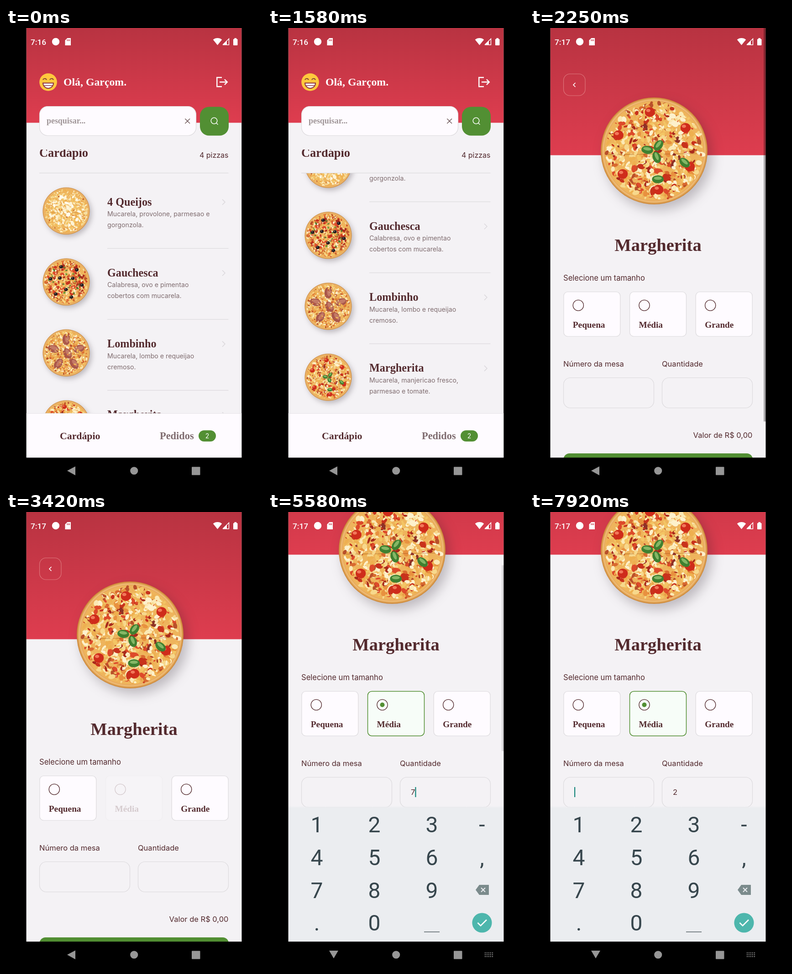
Recreate the animation shown at these times as an HTML page with a canvas. Size 561 by 998 pixels, loop 8 s.

```html
<!DOCTYPE html>
<html lang="pt-BR">
<head>
<meta charset="utf-8">
<title>Pizzaria</title>
<style>
html, body { margin: 0; width: 100%; height: 100%; overflow: hidden; background: #000; }
canvas { display: block; width: 100%; height: 100%; }
</style>
</head>
<body>
<canvas id="stage" width="561" height="998"></canvas>
<script>
const W = 561, H = 998, LOOP = 8000, FPS = 12;
const LEFT = 44.5, WIDTH = 472, BOTTOM = 940.3;
const SERIF = '"Liberation Serif", "Noto Serif", serif';
const SANS = 'Inter, "Open Sans", sans-serif';
const ROBOTO = 'Roboto, sans-serif';
const BG = '#f4f2f5', CARD = '#fefbff', LINE = '#dcdadd', DARK = '#532a2e', SOFT = '#7f6c6f';
const GREEN = '#528f33', GRAY = '#969696', KEYS = '#ebedf0';

const makeCanvas = (w, h) => Object.assign(document.createElement('canvas'), { width: w, height: h });
const stage = document.getElementById('stage').getContext('2d');
const layer = makeCanvas(W, H);
let c = stage;

// ---- motion: all times below are counted in ticks of 1/12 s ----
const ramp = (t, from, to) => Math.min(1, Math.max(0, (t - from) / (to - from)));
const easeOut = p => 1 - (1 - p) ** 2;
const touch = (t, down, up) => 1 - .8 * (ramp(t, down, down + 2) - ramp(t, up, up + 2));

// ---- drawing helpers ----
function text(str, x, y, font, color, align = 'left') {
  c.font = font;
  c.fillStyle = color;
  c.textAlign = align;
  c.fillText(str, x, y);
}
const serif = (str, x, y, size, color = DARK, align) => text(str, x, y, `bold ${size}px ${SERIF}`, color, align);
const sans = (str, x, y, size, color = DARK, align) => text(str, x, y, `${size}px ${SANS}`, color, align);

function paint(fill, border, width) {
  if (fill) { c.fillStyle = fill; c.fill(); }
  if (border) { c.strokeStyle = border; c.lineWidth = width; c.stroke(); }
}
function rect(x, y, w, h, color) {
  c.fillStyle = color;
  c.fillRect(x, y, w, h);
}
function box(x, y, w, h, r, fill, border, width = 1.2) {
  c.beginPath();
  c.roundRect(x, y, w, h, r);
  paint(fill, border, width);
}
function disc(x, y, r, fill, border, width = 1.4) {
  c.beginPath();
  c.arc(x, y, r, 0, 7);
  paint(fill, border, width);
}
function trace(pts) {
  c.beginPath();
  for (let i = 0; i < pts.length; i += 2) c.lineTo(pts[i], pts[i + 1]);
}
function poly(color, ...pts) { trace(pts); paint(color); }
function path(color, width, ...pts) { trace(pts); paint(null, color, width); }
function chevron(x, y, w, h, color, width) {
  path(color, width, x, y - h, x + w, y, x, y + h);
}
function cross(x, y, r, color, width) {
  path(color, width, x - r, y - r, x + r, y + r);
  path(color, width, x - r, y + r, x + r, y - r);
}
function clipped(x, y, w, h, draw) {
  c.save();
  c.beginPath();
  c.rect(x, y, w, h);
  c.clip();
  draw();
  c.restore();
}

// ---- pizzas: seeded toppings inside a unit circle ----
const PR = 117, PC = 120;
const CHEESE = ['#fbe9b4', '#f7d88c', '#f3c565', '#eeb050', '#fdf1cc'];
const RED = ['#c8321c', '#a92a1c', '#dd4a2a'];
const BAKED = ['#e8913f', '#d96a30', '#b9502a'];

function random(seed) {
  return () => {
    seed = (seed * 1664525 + 1013904223) % 4294967296;
    return seed / 4294967296;
  };
}

function blob(x, y, rx, ry, color, turn = 0) {
  c.beginPath();
  c.ellipse(x, y, rx, ry, turn, 0, 7);
  paint(color);
}
function ring(n, radius, phase, draw) {
  for (let i = 0; i < n; i++) {
    const a = phase + i * 2 * Math.PI / n;
    draw(Math.cos(a) * radius, Math.sin(a) * radius, a);
  }
}

function bakePizza(seed, tints, toppings) {
  const rnd = random(seed), img = makeCanvas(PC * 2, PC * 2), back = c;
  const scatter = (n, colors, min, max, reach = .9) => {
    for (let i = 0; i < n; i++) {
      const a = rnd() * 2 * Math.PI, d = Math.sqrt(rnd()) * reach, r = min + rnd() * (max - min);
      blob(Math.cos(a) * d, Math.sin(a) * d, r, r * (.3 + rnd() * .5), colors[Math.floor(rnd() * colors.length)], rnd() * 3);
    }
  };
  c = img.getContext('2d');
  c.translate(PC, PC);
  c.scale(PR, PR);
  const crust = c.createRadialGradient(0, 0, .9, 0, 0, 1);
  crust.addColorStop(0, '#c9702a');
  crust.addColorStop(.5, '#f2c078');
  crust.addColorStop(1, '#c9812f');
  disc(0, 0, 1, crust);
  disc(0, 0, .93, '#eeb45c');
  scatter(650, tints, .02, .07);
  path('rgba(150,70,25,.45)', .012, -.9, .07, .9, .05);
  toppings(scatter);
  c = back;
  return img;
}

const queijos = bakePizza(5, CHEESE, scatter => {
  scatter(50, BAKED, .012, .04);
  scatter(46, ['#fdf3d6', '#fffaea'], .04, .11, .8);
});
const gauchesca = bakePizza(11, [...CHEESE, ...BAKED, ...RED], scatter => {
  scatter(30, RED, .05, .12, .8);
  scatter(90, CHEESE, .02, .06);
  scatter(20, ['#6f9a35', '#4f7d2b'], .03, .07, .75);
  const olive = (x, y) => {
    blob(x, y, .08, .07, '#211c20');
    blob(x - .02, y - .02, .025, .02, '#8a7a70');
  };
  ring(6, .68, -1.9, olive);
  ring(3, .32, -.5, olive);
});
const lombinho = bakePizza(23, [...CHEESE, ...BAKED], scatter => {
  const ham = (x, y, turn) => {
    blob(x, y, .24, .16, '#a9564a', turn);
    blob(x + .03, y - .03, .17, .08, '#c47a66', turn);
  };
  ring(5, .57, -1.57, ham);
  ham(.05, .02, 1);
  scatter(150, [...CHEESE, ...BAKED], .015, .06);
});
const margherita = bakePizza(37, [...CHEESE, ...CHEESE, ...BAKED, ...RED], scatter => {
  scatter(45, [...RED, '#8e3226'], .03, .09, .8);
  scatter(170, CHEESE, .02, .06);
  ring(6, .73, -1.68, (x, y) => {
    blob(x, y, .095, .09, '#cf2c1b');
    blob(x - .03, y - .03, .04, .03, '#f2785a');
  });
  const leaf = (x, y, turn) => {
    blob(x, y, .11, .075, '#3f8030', turn);
    blob(x, y - .02, .075, .03, '#85b766', turn);
  };
  ring(3, .13, -.9, leaf);
  leaf(.57, .22, .7);
  leaf(.07, .53, 0);
});

function pizza(img, x, y, r) {
  const size = 2 * PC * r / PR;
  c.save();
  c.imageSmoothingQuality = 'high';
  c.shadowColor = 'rgba(40,30,40,.27)';
  c.shadowBlur = r * .22;
  c.shadowOffsetX = r * .08;
  c.shadowOffsetY = r * .1;
  c.drawImage(img, x - size / 2, y - size / 2, size, size);
  c.restore();
}

const menu = [
  ['4 Queijos', 'Mucarela, provolone, parmesao e', 'gorgonzola.', queijos],
  ['Gauchesca', 'Calabresa, ovo e pimentao', 'cobertos com mucarela.', gauchesca],
  ['Lombinho', 'Mucarela, lombo e requeijao', 'cremoso.', lombinho],
  ['Margherita', 'Mucarela, manjericao fresco,', 'parmesao e tomate.', margherita],
];

// ---- shared parts ----
function page(headerHeight) {
  const g = c.createLinearGradient(0, 0, 0, headerHeight);
  g.addColorStop(0, '#b83341');
  g.addColorStop(1, '#de3d4f');
  rect(LEFT, 0, WIDTH, headerHeight, g);
}

function statusBar(clock) {
  text(clock, 54, 36.5, `500 17.3px ${ROBOTO}`, '#fff');
  disc(109, 30, 8.2, '#fff');
  poly('#fff', 129.5, 27, 134.5, 22, 142, 22, 142, 38, 129.5, 38);
  for (let i = 0; i < 3; i++) rect(133.5 + i * 2.6, 25, 1.3, 3.5, '#c23746');
  c.beginPath();
  c.moveTo(463.5, 37.5);
  c.arc(463.5, 37.5, 15.5, -2.25, -.89);
  paint('#fff');
  path('#fff', 1.5, 475, 36.8, 488.5, 36.8, 488.5, 23.5, 475, 36.8);
  poly('#fff', 475, 37, 484, 28.5, 484, 37);
  box(498, 24, 9.5, 14, 1.5, '#fff');
  rect(500.5, 22, 4.5, 3, '#fff');
}

function navBar(typing) {
  if (typing) {
    poly(GRAY, 134, 960, 154, 960, 144, 977);
    for (let i = 0; i < 15; i++) rect(475 + (i % 5) * 4, 964 + Math.floor(i / 5) * 4, 2, 2, GRAY);
  } else {
    poly(GRAY, 134, 969, 152, 959.5, 152, 979);
  }
  disc(280.7, 969, 8.6, GRAY);
  box(407, 960.5, 18.5, 18, 1, GRAY);
}

// ---- menu ----
function emoji() {
  disc(92.5, 118.5, 19.3, '#ffc83d');
  for (const x of [85, 100]) {
    c.beginPath();
    c.arc(x, 115, 4.3, 3.5, 5.93);
    paint(null, '#7d3c37', 2);
  }
  c.beginPath();
  c.arc(92.5, 120.5, 11.5, 0, Math.PI);
  c.closePath();
  paint('#fff', '#8d3340', 2);
  path('#8d3340', 1.6, 83, 126, 102, 126);
}

function menuRow([name, first, second, img], y, alpha) {
  c.globalAlpha = alpha;
  pizza(img, 132, y + 20, 51.5);
  serif(name, 222, y + 8, 24.2);
  sans(first, 222, y + 31.5, 14.2, SOFT);
  sans(second, 222, y + 55.5, 14.2, SOFT);
  chevron(474, y + .5, 6, 6, '#dbd8dc', 1.5);
  c.globalAlpha = 1;
  rect(222, y + 101.3, 265.5, 1.2, LINE);
}

function menuScreen(t) {
  const scroll = 102 * easeOut(ramp(t, 1, 5));
  const press = touch(t, 14, 17);
  rect(LEFT, 0, WIDTH, BOTTOM, BG);
  page(207.4);
  emoji();
  serif('Olá, Garçom.', 126, 126, 23.8, '#fff');
  path('#fff', 2.4, 473, 108.3, 462.3, 108.3, 462.3, 128.3, 473, 128.3);
  path('#fff', 2.4, 468, 118.3, 484, 118.3);
  chevron(479, 118.3, 5.8, 5.8, '#fff', 2.4);

  box(73.5, 171.5, 343, 64, 18, CARD, LINE);
  serif('pesquisar...', 89, 209, 17.9, '#a09698');
  cross(397.7, 203.7, 5.3, '#6c5355', 1.4);
  box(425, 172.5, 63, 63, 20, GREEN);
  disc(456, 203, 6.8, null, '#fff', 1.5);
  path('#fff', 1.5, 461, 208, 464.5, 211.5);

  clipped(LEFT, 266, WIDTH, 51, () => serif('Cardápio', 73, 282, 26.4));
  sans('4 pizzas', 487.5, 284, 16, DARK, 'right');
  rect(73, 316.8, 414.5, 1.2, LINE);
  clipped(LEFT, 318, WIDTH, 525, () => menu.forEach((item, i) =>
    menuRow(item, 380.5 + i * 155.3 - scroll, item[3] === margherita ? press : 1)));

  rect(LEFT, 843, WIDTH, 98, CARD);
  rect(LEFT, 843, WIDTH, 1, '#e6e3e7');
  serif('Cardápio', 118, 900, 21.8);
  serif('Pedidos', 337, 900, 22.4, SOFT);
  box(422, 880.5, 38, 24.5, 12.2, GREEN);
  sans('2', 441, 898, 14, '#fff', 'center');
}

// ---- order ----
function sizeCard(name, x, alpha, selected) {
  c.globalAlpha = alpha;
  box(x, 577.5, 124, 97.5, 9, selected ? '#f7fdf8' : CARD, selected ? GREEN : LINE, selected ? 1.5 : 1.2);
  disc(x + 32, 607, 11.6, null, DARK);
  if (selected) disc(x + 32, 607, 5, GREEN);
  serif(name, x + 20, 656, 19.3);
  c.globalAlpha = 1;
}

function field(label, x, value, caret) {
  sans(label, x, 741, 16.5);
  box(x + .5, 765.5, 198, 66, 15, null, LINE);
  sans(value, x + 24, 804, 16.5);
  if (caret) rect(x + 24 + c.measureText(value).width, 787, 2.2, 22, '#16857a');
}

function keyboard() {
  const fade = c.createLinearGradient(0, 643, 0, 648);
  fade.addColorStop(0, 'rgba(235,237,240,0)');
  fade.addColorStop(1, KEYS);
  rect(LEFT, 643, WIDTH, 298, fade);
  ['123-', '456,', '789', '.0'].forEach((keys, row) => [...keys].forEach((key, i) =>
    text(key, i < 3 ? 107 + i * 126 : 469, 701 + row * 71.8, `48px ${ROBOTO}`, '#37464d', 'center')));
  rect(342, 918, 34, 2, '#7d868a');
  poly('#7b8b8c', 455, 827, 463, 816, 484, 816, 484, 838, 463, 838);
  cross(471.5, 827, 4.5, KEYS, 2);
  disc(469, 899, 21.6, '#4db6ac');
  path('#fff', 2.6, 459.5, 899, 466, 905.5, 479, 892.5);
}

function orderScreen(t) {
  const scroll = 185 * easeOut(ramp(t, 60, 62));
  const loaded = t >= 27, selected = t >= 49, typing = t >= 56, tableFocus = t >= 92;
  const bar = typing ? (t >= 58) - ramp(t, 63, 69) : (t >= 24) - ramp(t, 36, 39);
  const amount = t >= 80 ? '2' : t >= 64 && t < 77 ? '7' : '';
  const blink = Math.floor(t / 6) % 2 === 1;

  rect(LEFT, 0, WIDTH, BOTTOM, BG);
  c.save();
  c.translate(0, -scroll);
  page(278.4);
  box(73.5, 100.5, 47.5, 47.5, 14, null, 'rgba(255,215,205,.38)');
  chevron(99.5, 124.5, -4.5, 4.5, '#fff', 1.7);
  if (loaded) {
    pizza(margherita, 272, 269, 117);
    serif('Margherita', 280.5, 488, 38.5, DARK, 'center');
  }
  sans('Selecione um tamanho', 73, 553, 16.6);
  ['Pequena', 'Média', 'Grande'].forEach((name, i) =>
    sizeCard(name, 73.8 + i * 144.7, i === 1 ? touch(t, 39, 42) : 1, i === 1 && selected));
  field('Número da mesa', 73, '', tableFocus);
  field('Quantidade', 289, amount, typing && !tableFocus && blink);
  sans(`Valor de R$ ${selected ? 29 : 0},00`, 487.5, 897, 16.5, DARK, 'right');
  box(73.5, 931, 414.5, 66, 13, GREEN);
  c.restore();

  const view = typing ? 646 : 940, content = 1026;
  rect(512, scroll * view / content, 5, view * view / content, `rgba(0,0,0,${.3 * bar})`);
  if (typing) keyboard();
}

function render(t) {
  const shown = ramp(t, 20, 24);
  c = stage;
  rect(0, 0, W, H, '#000');
  clipped(LEFT, 0, WIDTH, BOTTOM, () => {
    if (shown < 1) menuScreen(t);
    if (shown > 0) {
      c = layer.getContext('2d');
      orderScreen(t);
      c = stage;
      c.globalAlpha = shown;
      c.drawImage(layer, 0, 60 * (1 - easeOut(shown)));
      c.globalAlpha = 1;
    }
    statusBar(shown > 0 ? '7:17' : '7:16');
  });
  navBar(t >= 56);
}

const start = performance.now();
function tick() {
  const ms = (performance.now() - start) % LOOP;
  render(Math.floor(ms * FPS / 1000 + .05));
  requestAnimationFrame(tick);
}
tick();
</script>
</body>
</html>
```
